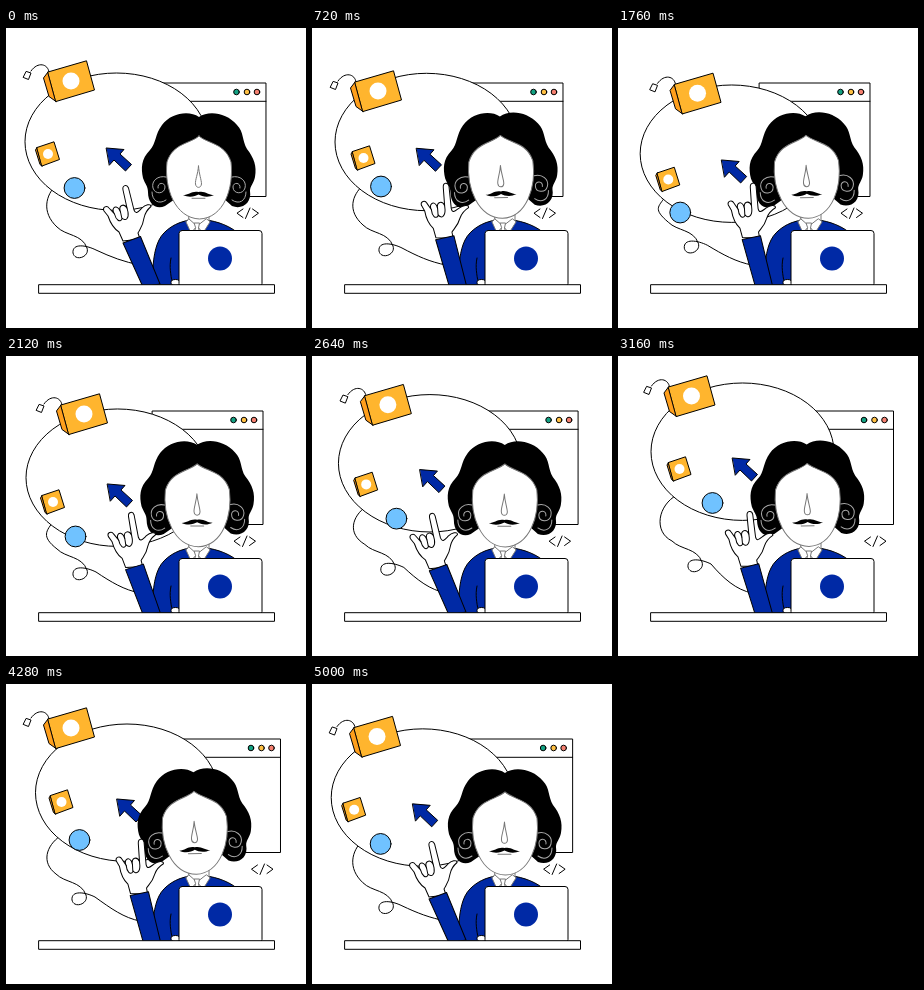
Write an HTML page that moves like this. It is 300 by 300 pixels and loops after 5040 ms.

```html
<!DOCTYPE html>
<html lang="en">
<head>
<meta charset="utf-8">
<title>Man at a laptop</title>
<style>
  html, body { margin: 0; width: 100%; height: 100%; overflow: hidden; background: #fff; }
  svg { display: block; width: 100%; height: 100%; }
  .ink { stroke: #000; stroke-width: 1; stroke-linejoin: round; stroke-linecap: round; }
  .line { fill: none; }
  .white { fill: #fff; }
  .blue { fill: #0029a5; }
  .face { fill: #ffb52e; }
  .side { fill: #ff9f1c; }
  .grey { stroke: #777; }
  .curl { fill: none; stroke: #aaa; stroke-width: 1; stroke-linecap: round; }
</style>
</head>
<body>
<svg viewBox="0 0 300 300">
  <g id="win" class="ink">
    <rect class="white" x="149.5" y="55" width="110.5" height="113.5"/>
    <path class="line" d="M149.5 73.3H260"/>
    <circle cx="230.5" cy="64" r="2.8" fill="#12a182"/>
    <circle cx="241" cy="64" r="2.8" fill="#ffc043"/>
    <circle cx="251" cy="64" r="2.8" fill="#f58070"/>
    <path class="line" d="M237 181L231 185.200L237 189.500M239.500 190.500L244 180M246.500 181L252.500 185.200L246.500 189.500"/>
  </g>

  <path id="cord" class="ink line"/>

  <g id="bubble" class="ink">
    <ellipse class="white" cx="110.5" cy="113.7" rx="91.5" ry="68.7"/>
    <path class="blue" d="M100.500 120L118 121.500L114 126L125.500 136.500L119.500 143L108 132L103.500 137Z"/>
  </g>

  <circle id="ball" class="ink" cx="68.500" cy="160" r="10.400" fill="#70c2ff"/>

  <g id="box" class="ink">
    <path class="line" d="M43 44C42 36 32 33 25 43"/>
    <path class="white" d="M20.500 43.500L25 45L22.500 51.500L17.500 49.500Z"/>
    <path class="side" d="M42 44L37.500 50L43 68.500L50 73.500Z"/>
    <path class="face" d="M42 44L80.500 32.800L88.500 62L50 73.500Z"/>
    <circle cx="65" cy="53" r="8.500" fill="#fff" stroke="none"/>
  </g>

  <g id="cube" class="ink">
    <path class="side" d="M31 119.500L29.500 122L34 136.500L36 138Z"/>
    <path class="face" d="M31 119.500L48 113.800L53.500 131.500L36 138Z"/>
    <circle cx="42" cy="126" r="5" fill="#fff" stroke="none"/>
  </g>

  <g class="ink">
    <path class="blue" d="M184 192C170 194 158 202 153 212C148 222 146 238 147 257H235V208C226 198 210 193 200 192Z"/>
    <path class="white grey" d="M183 178H203V194L191 208L183 194Z"/>
    <path class="white grey" d="M183 191L191 198L185 205L180 194ZM200 191L191 198L197 205L204 194Z"/>
    <path class="white grey" d="M188.500 195H193.500L192.500 200L194 206H188L189.500 200Z"/>
    <path class="line" d="M165 230C163 239 165 247 166 254"/>
  </g>

  <g id="head">
    <path d="M193 89C183 82 165 85 156 97C149 106 150 116 144 122C135 131 135 140 137 150C139 156 142 158 142 164C142 176 150 182 159 178L172 169H216L226 178C236 182 246 175 244 163C244 158 248 155 249 149C251 138 248 130 241 121C236 113 238 104 231 97C221 85 203 82 193 89Z"/>
    <path class="ink grey white" d="M193 108C184 116 167 115 161 134C158 160 169 190 193.500 191C218 190 228 160 225 134C219 115 202 116 193 108Z"/>
    <g id="curls">
      <path class="curl" d="M160 149C152 147 145 153 147 160C149 167 159 166 159 159C159 154 151 154 152 160M146 164C146 173 153 177 160 172"/>
      <path class="curl" d="M226 149C234 147 241 153 239 160C237 167 227 166 227 159C227 154 235 154 234 160M240 164C240 173 233 177 226 172"/>
    </g>
    <path class="ink grey line" d="M192.500 138C192 146 189 152 189.500 156C190 160.500 195 160.500 195.500 156C195.500 152 193 146 192.500 138ZM186 170.300H199"/>
    <path d="M177 167C183 167 186 162.500 192.500 164C199 162.500 202 167 208 167C202 170 196 168.500 192.500 166.500C189 168.500 183 170 177 167Z"/>
  </g>

  <g id="arm" class="ink">
    <path class="white" d="M117 213L113 204C107 200 104 194 102 188L98 183C96 179 101 177 103 180L108.500 186C105 181 109 176 113 181L114.500 184C112 177 118 175 121 180L117 162C116 157 121 156 122.500 160L128 182C130 187 132 184 136 180C139 177 145 175 145 178.500C142 181 139 185 138 190C137 198 134 201 132 205L134 211Z"/>
    <path class="line" d="M108.500 186C110 192 114 195 116 191L114.500 184M116 190C120 194 123 190 122 184L121 180"/>
    <path class="blue" d="M117 215L134.500 208.500L154 256L137 259Z"/>
  </g>

  <g class="ink">
    <ellipse class="white" cx="169.500" cy="254.500" rx="4.500" ry="3"/>
    <rect class="white" x="173" y="202.500" width="83" height="56" rx="3"/>
    <circle class="blue" cx="214" cy="230.500" r="12" stroke="none"/>
    <rect class="white" x="33" y="256.700" width="235.500" height="8.600"/>
  </g>
</svg>
<script>
const LOOP = 5040;
const el = id => document.getElementById(id);

// [time, dx, dy] offsets from the resting pose
const tracks = {
  win: [[0, 0, 0], [720, -9, 0], [1260, -12.7, 0], [2120, -3, 0], [2800, 9, 0], [3160, 15.5, 0], [3690, 21, 0], [4280, 14.5, 0]],
  bubble: [[0, 0, 0], [720, 4, 0.3], [1360, 7, 12], [2120, 1, 8], [3160, 14, -18], [4280, 10.5, -5]],
  box: [[0, 0, 0], [300, -1.5, 3], [720, 1, 10], [1360, 14, 18], [2120, 13, 5], [3160, 8.5, -13], [3760, 6.5, -19], [4280, 0, -9]],
  cube: [[0, 0, 0], [720, 9.5, 4], [1360, 13.5, 25], [2120, 5, 20], [3160, 19.5, -13], [4280, 13.5, -8]],
  ball: [[0, 0, 0], [720, 0.5, -1.5], [1360, -10.5, 22], [2120, 1, 20.5], [3160, 26, -13], [4280, 5, -4]],
  loop: [[0, 0, 0], [720, 0, -2], [1360, -1, -4], [2120, 0, -6], [3160, 3, -14], [4280, -1, -9]]
};

// Smooth closed curve through the keys of a track
function sample(keys, t) {
  const n = keys.length;
  const key = i => {
    const turn = Math.floor(i / n), k = keys[i - turn * n];
    return [k[0] + turn * LOOP, k[1], k[2]];
  };
  let i = n - 1;
  while (keys[i][0] > t) i--;
  const [a, b, c, d] = [key(i - 1), key(i), key(i + 1), key(i + 2)];
  const span = c[0] - b[0], u = (t - b[0]) / span, v = 1 - u;
  return [1, 2].map(k => {
    const m0 = (c[k] - a[k]) / (c[0] - a[0]) * span;
    const m1 = (d[k] - b[k]) / (d[0] - b[0]) * span;
    return b[k] * (1 + 2 * u) * v * v + m0 * u * v * v + c[k] * u * u * (3 - 2 * u) - m1 * u * u * v;
  });
}

function cord([ex, ey], [lx, ly]) {
  const x = 50 + ex * 0.25 - ey * 0.3, y = 157 + ey;
  const p = (px, py) => `${px + lx} ${py + ly}`;
  return `M${x} ${y}C40 ${y + 10} 35 ${184 + ly * 0.6} ${p(51, 199)}` +
    `C${p(60, 208)} ${p(76, 206)} ${p(81, 220)}` +
    `C${p(84, 229)} ${p(69, 234)} ${p(67, 225)}` +
    `C${p(66, 215)} ${p(80, 217)} ${p(90, 222)}` +
    `C105 ${229 + ly / 2} 118 234 134 237`;
}

function draw(t) {
  const at = {};
  for (const id in tracks) {
    at[id] = sample(tracks[id], t);
    if (id !== "loop") el(id).setAttribute("transform", `translate(${at[id]})`);
  }
  el("cord").setAttribute("d", cord(at.bubble, at.loop));

  const half = LOOP / 4, u = 1 - Math.abs(1 - (t % (LOOP / 2)) / half);
  const sway = u * u * (3 - 2 * u);
  el("arm").setAttribute("transform", `rotate(${13.5 * sway} 143 260)`);
  el("head").setAttribute("transform", `translate(${-6.3 * sway} ${-sway}) rotate(${-2 * sway} 193 150)`);
}

const start = performance.now();
function tick(now) {
  draw(Math.max(0, now - start) % LOOP);
  requestAnimationFrame(tick);
}
draw(0);
requestAnimationFrame(tick);
</script>
</body>
</html>
```
